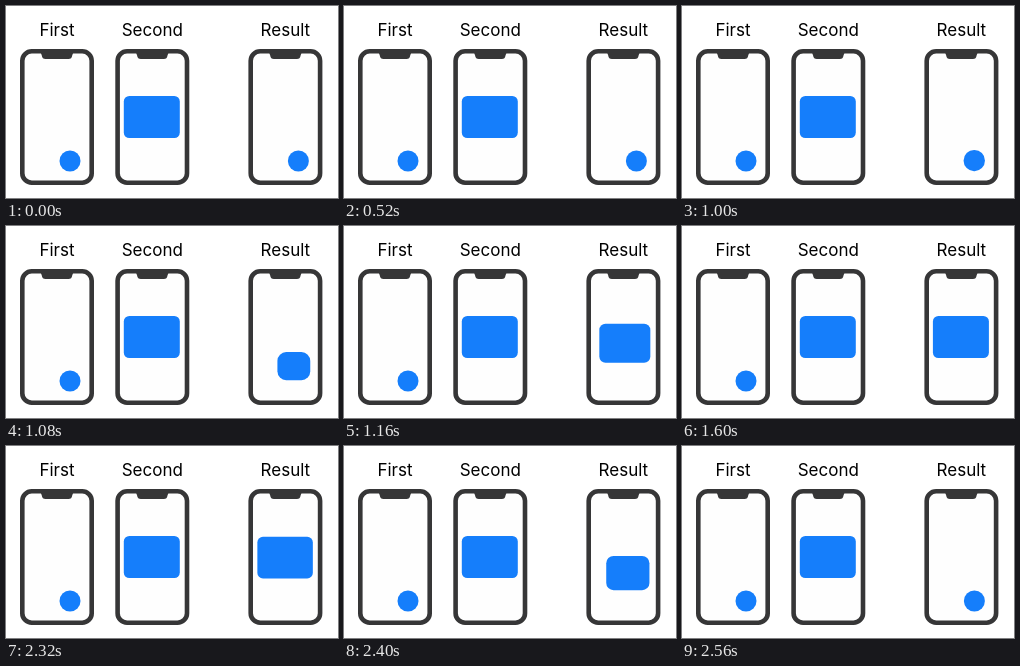
An HTML page that plays this animation: 332 px wide and 192 px high, repeating every 2600 ms.

```html
<!DOCTYPE html>
<html lang="en">
<head>
<meta charset="utf-8">
<title>Shape transition</title>
<style>
  html, body { margin: 0; width: 100%; height: 100%; overflow: hidden; background: #fff; }
  svg { display: block; width: 100%; height: 100%; }
  text { font: 17px Inter, "Liberation Sans", sans-serif; text-anchor: middle; fill: #000; }
</style>
</head>
<body>
<svg viewBox="0 0 332 192">
  <defs>
    <g id="phone">
      <rect x="2.3" y="45.3" width="69.4" height="131.4" rx="9.5" fill="#fefefe" stroke="#363637" stroke-width="4.6"/>
      <path d="M20.5 46H53.5L52.2 49.5Q51.8 53 48.5 53H25.5Q22.2 53 21.8 49.5Z" fill="#363637"/>
    </g>
  </defs>
  <g id="stage"></g>
</svg>
<script>
const LOOP = 2600, MOVE = 240, OPEN = 984, CLOSE = 2300;
const CIRCLE = { x: 39.5, y: 144.5, width: 21, height: 21, rx: 10.5 };
const CARD = { x: 8.5, y: 90, width: 56, height: 42, rx: 5.5 };
const stage = document.getElementById('stage');

function add(parent, tag, attrs, text = '') {
  const el = document.createElementNS('http://www.w3.org/2000/svg', tag);
  setAttrs(el, attrs);
  el.textContent = text;
  return parent.appendChild(el);
}

function setAttrs(el, attrs) {
  for (const key in attrs) el.setAttribute(key, attrs[key]);
}

function addPhone(x, title, shape) {
  const g = add(stage, 'g', { transform: `translate(${x} 0)` });
  add(g, 'text', { x: 37, y: 30.3 }, title);
  add(g, 'use', { href: '#phone' });
  return add(g, 'rect', { ...shape, fill: '#157efb' });
}

// cubic-bezier(.42, 0, .58, 1)
function ease(t) {
  if (t <= 0) return 0;
  if (t >= 1) return 1;
  let lo = 0, hi = 1, u = t;
  for (let i = 0; i < 20; i++) {
    u = (lo + hi) / 2;
    const v = 1 - u;
    if (3 * v * v * u * 0.42 + 3 * v * u * u * 0.58 + u ** 3 < t) lo = u;
    else hi = u;
  }
  return u * u * (3 - 2 * u);
}

addPhone(14, 'First', CIRCLE);
addPhone(109.3, 'Second', CARD);
const result = addPhone(242.4, 'Result', CIRCLE);

function draw(time) {
  const t = time % LOOP;
  const p = ease((t - OPEN) / MOVE) - ease((t - CLOSE) / MOVE);
  const shape = {};
  for (const key in CIRCLE) shape[key] = CIRCLE[key] + (CARD[key] - CIRCLE[key]) * p;
  setAttrs(result, shape);
}

const start = performance.now();
function tick() {
  draw(performance.now() - start);
  requestAnimationFrame(tick);
}
tick();
</script>
</body>
</html>
```
